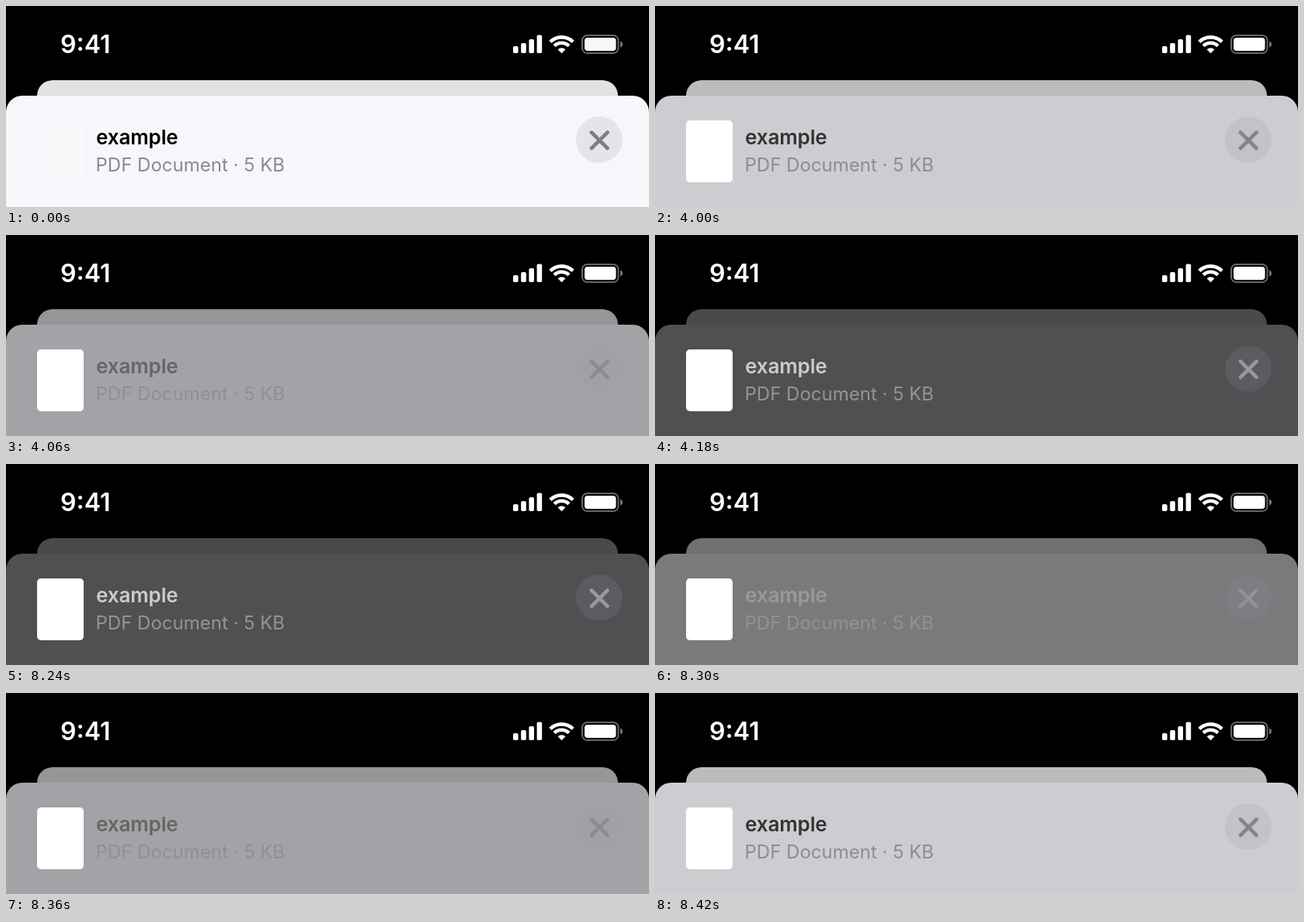
Animation of 828 by 260 pixels, one loop 8.48 s. Source, as an HTML page:

```html
<!DOCTYPE html>
<html lang="en">
<head>
<meta charset="utf-8">
<title>Share sheet, light to dark</title>
<style>
  html, body { margin: 0; width: 100%; height: 100%; overflow: hidden; background: #000; }
  svg { display: block; width: 100%; height: 100%; }
  text { font-family: Inter, "Liberation Sans", sans-serif; }
</style>
</head>
<body>
<svg viewBox="0 0 828 260">
  <rect width="828" height="260" fill="#000"/>

  <text x="70" y="61" font-size="32" font-weight="600" fill="#fff">9:41</text>
  <g id="bars" fill="#fff"></g>
  <g fill="none" stroke="#fff" stroke-width="4.6">
    <path d="M700.9 46.4a20.7 20.7 0 0 1 29.2 0"/>
    <path d="M706.1 51.7a13.2 13.2 0 0 1 18.8 0"/>
    <path d="M715.5 61.2l-4.9-4.9a7 7 0 0 1 9.8 0z" fill="#fff" stroke="none"/>
  </g>
  <rect x="742" y="38" width="46.5" height="23" rx="6.5" fill="none" stroke="#666" stroke-width="2"/>
  <path d="M791 45.5q3 1 3 4t-3 4z" fill="#777"/>
  <rect id="charge" x="745" y="41" width="40.5" height="17" rx="4"/>

  <rect id="back" x="40" y="96" width="748" height="60" rx="20"/>
  <rect id="sheet" y="116" width="828" height="180" rx="21"/>
  <rect id="page" x="40" y="148" width="60" height="80" rx="5"/>
  <text id="title" x="116" y="179" font-size="26" font-weight="600" letter-spacing="-0.1">example</text>
  <text id="info" x="115.5" y="214" font-size="24">PDF Document · 5 KB</text>
  <circle id="button" cx="764" cy="173" r="30"/>
  <path id="cross" d="M754 163.500l20.500 20.500m0-20.500l-20.500 20.500" fill="none" stroke-width="4.600" stroke-linecap="round"/>
</svg>
<script>
const LOOP = 8480, TO_DARK = 4000, TO_LIGHT = 8240, STEP = 60, STEPS = 5;
const $ = id => document.getElementById(id);

// id: [light, dark, attribute]
const theme = {
  back:   [[226, 225, 228], [36, 35, 37]],
  sheet:  [[248, 246, 250], [38, 37, 39]],
  title:  [[0, 0, 0], [255, 255, 255]],
  info:   [[138, 137, 142], [152, 151, 156]],
  button: [[229, 228, 232], [58, 57, 61]],
  cross:  [[126, 125, 130], [160, 159, 164], 'stroke']
};

$('bars').innerHTML = [9, 13, 18, 23.5].map((h, i) =>
  `<rect x="${653 + i * 10.2}" y="${61 - h}" width="6.6" height="${h}" rx="1.8"/>`).join('');

const stepsSince = time => Math.min(STEPS, Math.max(0, Math.floor(time / STEP) + 1));

function render(t) {
  const dark = (stepsSince(t - TO_DARK) - stepsSince(t - TO_LIGHT)) / STEPS;
  for (const [id, [from, to, attr = 'fill']] of Object.entries(theme)) {
    const rgb = from.map((c, i) => Math.round(c + (to[i] - c) * dark));
    $(id).setAttribute(attr, `rgb(${rgb})`);
  }
  // The white areas jump instead of fading.
  $('page').setAttribute('fill', dark ? '#fff' : '#faf8fb');
  $('charge').setAttribute('fill', dark ? '#fff' : '#f8f6fa');
}

const start = performance.now();
function frame() {
  render((performance.now() - start) % LOOP);
  requestAnimationFrame(frame);
}
frame();
</script>
</body>
</html>
```
